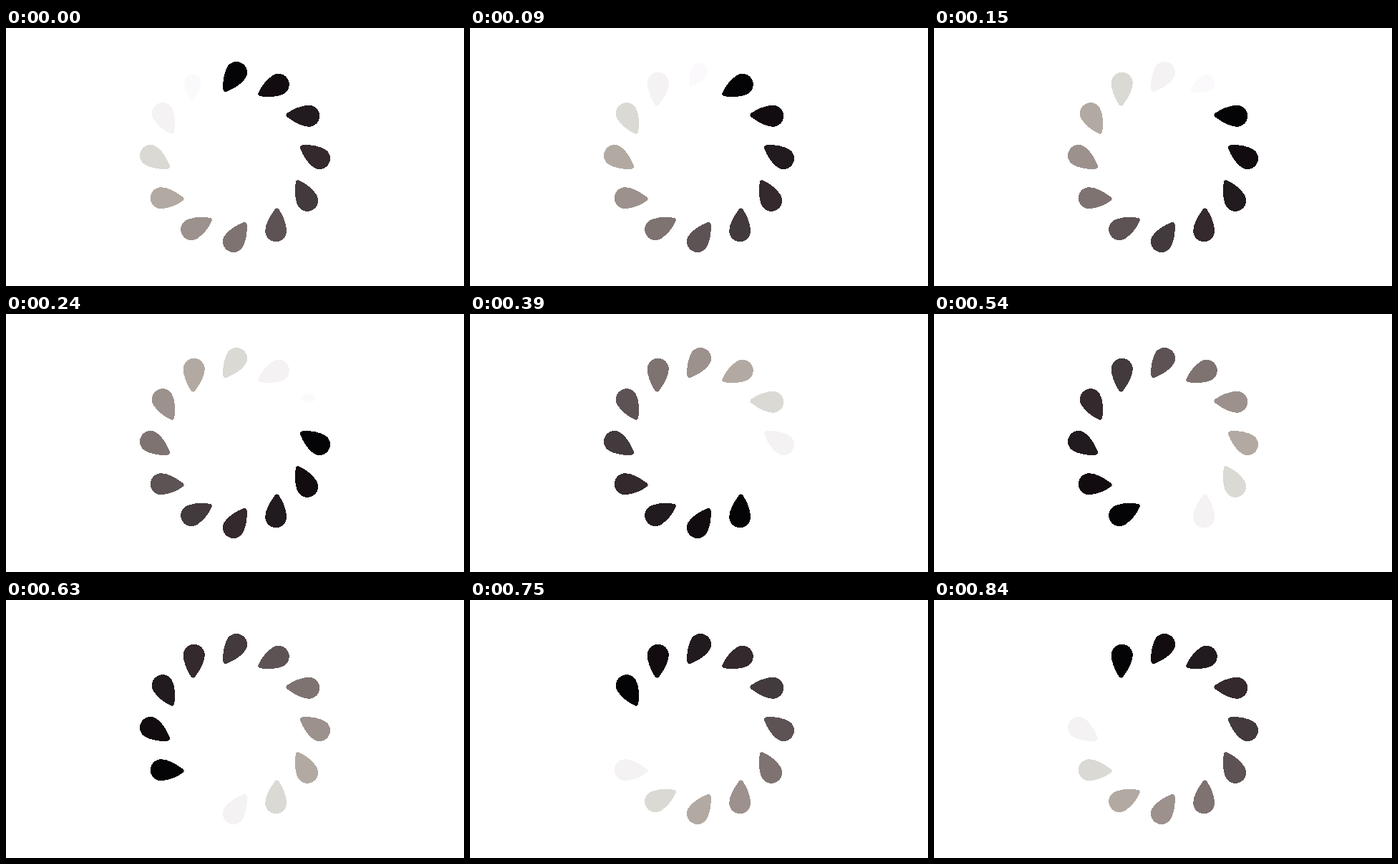
An HTML page that plays this animation: 640x360 px, repeating every 0.87 s.

```html
<!DOCTYPE html>
<html lang="en">
<head>
<meta charset="utf-8">
<title>Spinner</title>
<style>
  html, body { margin: 0; height: 100%; overflow: hidden; background: #fff; }
  svg { display: block; width: 100%; height: 100%; shape-rendering: crispEdges; }
</style>
</head>
<body>
<svg viewBox="0 0 640 360"></svg>
<script>
const LOOP = 870, TICK = 30, STEP = 75, COUNT = 12;
const SHADES = ['#040305', '#120c10', '#211b1f', '#34292d', '#423a3c', '#5e5354',
  '#7e7371', '#9c918d', '#b2aaa2', '#dbd9d4', '#f5f2f4', '#fbf9fc'];
const DROP = 'M-15 0A15 15 0 0 1 15 0C15 10.5 6.5 23.5 2 29.5Q-1.2 34 -4.5 29.5C-9 23.5 -15 10.5 -15 0Z';

const svg = document.querySelector('svg');
const drops = Array.from({ length: COUNT }, () => {
  const path = document.createElementNS('http://www.w3.org/2000/svg', 'path');
  path.setAttribute('d', DROP);
  return svg.appendChild(path);
});

// The oldest drop leaves a faint, shrunken trace early in each turn.
const traceScale = step => step < 3 ? 0.78 : step === 3 ? 0.42 : 0;

function draw(now) {
  const time = Math.floor(now % LOOP / TICK) * TICK;
  const step = Math.floor(time / STEP);
  drops.forEach((drop, i) => {
    const age = (i - step + COUNT) % COUNT;
    const scale = age === COUNT - 1 ? traceScale(step) : 1;
    drop.setAttribute('fill', SHADES[age]);
    drop.setAttribute('visibility', scale ? 'visible' : 'hidden');
    drop.setAttribute('transform', `translate(320 180) rotate(${(i + 1) * 30})
      translate(-66.2 -106.2) scale(${scale || 1}) translate(9 3)`);
  });
}

const start = performance.now();
function loop() {
  draw(performance.now() - start);
  requestAnimationFrame(loop);
}
loop();
</script>
</body>
</html>
```
